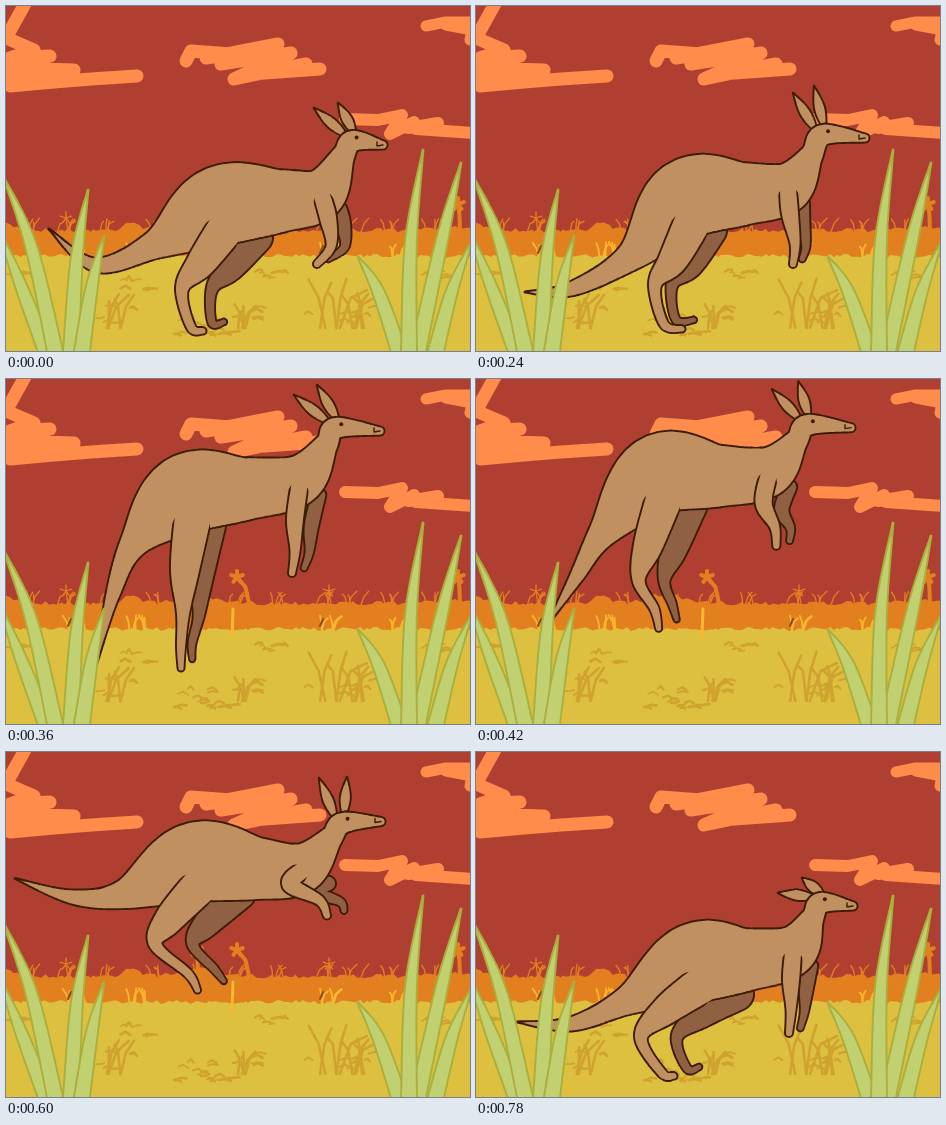
Recreate the animation shown at these times as an HTML page with a canvas. Size 464 by 345 pixels, loop 0.84 s.

```html
<!DOCTYPE html>
<html lang="en">
<head>
<meta charset="utf-8">
<title>Hopping kangaroo</title>
<style>
html, body { margin: 0; width: 100%; height: 100%; overflow: hidden; background: #af4031; }
canvas { display: block; }
</style>
</head>
<body>
<canvas id="stage" width="464" height="345"></canvas>
<script>
const W = 464, H = 345, LOOP = 840, STEP = 60;
const SKY = '#af4031', CLOUD = '#ff8c4a', BUSH = '#e28020', TUFT = '#f9b62f';
const GROUND = '#dec040', STRAW = '#d0a22f', BLADE = '#c1d070', BLADE_EDGE = '#aaae3c';
const FUR = '#c09061', SHADE = '#8f6041', INK = '#3d1c06';

// Joint positions of the key poses.
// spine: tail tip, tail, tail root, rump, waist, shoulder, neck, crown, nose
// leg: knee, hock, heel, toe; arm: elbow, wrist, hand; ears: near tip, far tip
// stride and reach: how far the far leg and far arm are ahead of the near ones
const poses = [
  { at: 0, stride: [30], reach: [16],
    spine: [43, 223, 90, 259, 150, 238, 213, 200, 275, 195, 315, 188, 337, 150, 347, 135, 377, 139],
    leg: [195, 257, 176, 283, 185, 321, 197, 325], arm: [322, 212, 325, 240, 311, 258],
    ears: [308, 102, 332, 97] },
  { at: 120, stride: [25], reach: [19],
    spine: [38, 242, 85, 266, 147, 246, 215, 199, 270, 196, 315, 191, 343, 159, 353, 146, 388, 150],
    leg: [192, 258, 172, 282, 188, 321, 204, 324], arm: [317, 208, 326, 232, 320, 250],
    ears: [322, 106, 351, 103] },
  { at: 240, stride: [17], reach: [13],
    spine: [49, 286, 95, 283, 155, 250, 210, 193, 268, 188, 311, 182, 335, 150, 347, 129, 389, 132],
    leg: [197, 254, 179, 279, 188, 318, 206, 323], arm: [314, 208, 319, 238, 317, 258],
    ears: [317, 87, 338, 80] },
  { at: 360, stride: [16], reach: [17],
    spine: [89, 290, 107, 215, 129, 163, 180, 115, 240, 110, 293, 101, 320, 66, 330, 49, 374, 52],
    leg: [179, 190, 177, 235, 175, 268, 175, 289], arm: [289, 140, 289, 172, 286, 194],
    ears: [288, 16, 311, 6] },
  { at: 540, stride: [45], reach: [22],
    spine: [33, 163, 88, 162, 124, 134, 185, 57, 243, 71, 290, 77, 319, 57, 335, 40, 377, 42],
    leg: [158, 120, 134, 133, 185, 153, 198, 170], arm: [285, 92, 318, 99, 329, 112],
    ears: [312, -1, 345, -4] },
  { at: 660, stride: [30], reach: [26],
    spine: [-15, 90, 45, 128, 113, 150, 192, 163, 257, 162, 300, 156, 330, 116, 339, 102, 373, 97],
    leg: [168, 215, 165, 252, 179, 290, 185, 306], arm: [284, 173, 309, 198, 313, 215],
    ears: [314, 53, 337, 54] },
  { at: 780, stride: [36], reach: [16],
    spine: [41, 270, 95, 272, 152, 248, 218, 211, 270, 208, 316, 199, 336, 167, 345, 151, 377, 154],
    leg: [190, 258, 165, 285, 186, 321, 198, 324], arm: [315, 228, 315, 258, 313, 281],
    ears: [302, 141, 326, 126] }
];
poses.push({ ...poses[0], at: LOOP });

const SPINE_R = [0.5, 7.5, 15, 40, 31.5, 25, 12, 11, 4.5];
const LEG_R = [19, 15, 7, 5, 3.5];
const ARM_R = [9, 9, 5.5, 4];
const EAR_R = [2.5, 5.5, 0.3];

const mix = (a, b, k) => a + (b - a) * k;
const between = (p, q, k) => [mix(p[0], q[0], k), mix(p[1], q[1], k)];
const shift = (p, dx, dy) => [p[0] + dx, p[1] + dy];

function poseAt(time) {
  const next = poses.findIndex(p => p.at > time);
  const a = poses[next - 1], b = poses[next];
  const k = (time - a.at) / (b.at - a.at);
  const joints = part => {
    const flat = a[part].map((v, i) => mix(v, b[part][i], k));
    return flat.length < 2 ? flat[0]
      : flat.flatMap((x, i) => i % 2 ? [] : [[x, flat[i + 1]]]);
  };
  return {
    spine: joints('spine'), leg: joints('leg'), arm: joints('arm'),
    ears: joints('ears'), stride: joints('stride'), reach: joints('reach')
  };
}

// Smooth samples [x, y, radius] along a chain of joints.
function samples(joints, radii, perJoint = 40) {
  const knots = joints.map((p, i) => [...p, radii[i]]);
  const at = i => knots[Math.max(0, Math.min(knots.length - 1, i))];
  const out = [];
  for (let s = 0; s <= (knots.length - 1) * perJoint; s++) {
    const i = Math.floor(s / perJoint), t = s / perJoint - i;
    const [p, q, r, u] = [at(i - 1), at(i), at(i + 1), at(i + 2)];
    out.push(q.map((v, n) => v + t * ((r[n] - p[n]) / 2
      + t * (p[n] - 2.5 * v + 2 * r[n] - u[n] / 2
      + t * (1.5 * (v - r[n]) + (u[n] - p[n]) / 2)))));
  }
  return out;
}

function dots(g, list, color, grow) {
  g.fillStyle = color;
  g.beginPath();
  for (const [x, y, r] of list) {
    const radius = Math.max(0, r + grow);
    g.moveTo(x + radius, y);
    g.arc(x, y, radius, 0, Math.PI * 2);
  }
  g.fill();
}

// Tapered limb; the outline is left open over the first `open` samples.
function limb(g, joints, radii, color, { open = 0, edge = INK } = {}) {
  const list = samples(joints, radii);
  dots(g, list.slice(open), edge, 1);
  dots(g, list, color, -0.9);
}

function layer(paint) {
  const canvas = document.createElement('canvas');
  canvas.width = W;
  canvas.height = H;
  const g = canvas.getContext('2d');
  g.lineCap = g.lineJoin = 'round';
  paint(g);
  return canvas;
}

function line(g, color, width, ...points) {
  g.strokeStyle = color;
  g.lineWidth = width;
  g.beginPath();
  for (const p of points) g.lineTo(...p);
  g.stroke();
}

let seed = 7;
const rand = (lo, hi) => {
  seed = (seed * 16807) % 2147483647;
  return mix(lo, hi, seed / 2147483647);
};

function ragged(g, color, height, jag) {
  g.fillStyle = color;
  g.beginPath();
  g.moveTo(0, H);
  for (let x = 0; x < W + 5; x += rand(2, 5)) g.lineTo(x, height(x) + rand(-jag, jag));
  g.lineTo(W, H);
  g.fill();
}

function flower(g, x, y, r, width, lean) {
  for (let i = 0; i < 5; i++) {
    const a = Math.PI * (0.4 * i - 0.5);
    line(g, BUSH, width, [x, y], [x + r * Math.cos(a), y + r * Math.sin(a)]);
  }
  line(g, BUSH, width, [x, y], [x + lean * 0.7, y + 10], [x + lean, 224]);
}

function tuft(g, color, x, y, w, h, count, width) {
  for (let i = 0; i < count; i++) {
    const px = x + rand(-w, w) / 2, lean = rand(-0.4, 0.7) * h;
    line(g, color, width, [px, y], [px + lean * 0.4, y - h * 0.6], [px + lean, y - h * rand(0.7, 1)]);
  }
}

function dashes(g, x, y, w, h, count) {
  for (let i = 0; i < count; i++) {
    const px = x + rand(-w, w) / 2, py = y + rand(-h, h) / 2, len = rand(5, 13);
    line(g, STRAW, rand(1.5, 3), [px, py], [px + len / 2, py - rand(0, 3)], [px + len, py + rand(-2, 2)]);
  }
}

const hump = (x, middle, width) => Math.exp(-(((x - middle) / width) ** 2));
const bushTop = x => 224 - 8 * hump(x, 188, 22) - 9 * hump(x, 125, 10) - 5 * hump(x, 0, 14) - 4 * hump(x, 445, 20);

const backdrop = layer(g => {
  g.fillStyle = SKY;
  g.fillRect(0, 0, W, H);
  // Clouds are scribbled with a fat brush.
  line(g, CLOUD, 13, [20, -4], [0, 32], [28, 44], [4, 52], [44, 50], [4, 62], [68, 64], [4, 72],
    [45, 75], [4, 80], [48, 76], [85, 73], [131, 70]);
  line(g, CLOUD, 13, [180, 55], [185, 45], [225, 48], [200, 52], [272, 38], [215, 58], [285, 47],
    [228, 73], [300, 58], [245, 68], [314, 63]);
  line(g, CLOUD, 12, [339, 113], [372, 114], [396, 109], [384, 128], [408, 116], [402, 122],
    [432, 117], [410, 123], [466, 127]);
  line(g, CLOUD, 11, [420, 20], [440, 16], [468, 16], [440, 19], [466, 24], [464, 34]);

  ragged(g, BUSH, bushTop, 2.2);
  for (const x of [60, 323]) flower(g, x, 212, 6, 1.3, 2);
  for (const x of [190, 231, 452]) flower(g, x, 198, 6, 4, x === 231 ? 12 : 2);
  for (let x = 20; x < W; x += rand(28, 50)) tuft(g, BUSH, x, 226, 16, 14, 4, 1.3);

  for (const x of [72, 133, 320, 392]) tuft(g, TUFT, x, 252, 20, 16, 6, 1.8);
  for (const x of [62, 314]) line(g, '#8a4a20', 2, [x, 247], [x + 3, 240]);
  ragged(g, GROUND, () => 250, 2);
  line(g, TUFT, 3, [226, 258], [227, 230]);

  for (const x of [8, 260, 428]) dashes(g, x, 269, 36, 7, 6);
  dashes(g, 130, 279, 32, 12, 6);
  dashes(g, 195, 319, 56, 22, 18);
  for (const [x, size] of [[108, 36], [238, 24], [322, 50], [350, 40]]) {
    tuft(g, STRAW, x, 322, size / 2, size, 5, 2.6);
    dashes(g, x, 308, size, 18, 5);
  }
});

const foreground = layer(g => {
  // Tip, middle and foot of each grass blade.
  const blades = [
    [[-8, 222], [15, 280], [40, 345]],
    [[-2, 172], [25, 240], [49, 345]],
    [[82, 184], [71, 250], [65, 345]],
    [[98, 230], [86, 280], [76, 345]],
    [[352, 251], [372, 285], [393, 345]],
    [[466, 235], [446, 285], [430, 345]],
    [[455, 157], [437, 230], [412, 345]],
    [[417, 144], [405, 235], [403, 345]]
  ];
  for (const blade of blades) limb(g, blade, [0.5, 6, 8], BLADE, { edge: BLADE_EDGE });
});

const ctx = document.getElementById('stage').getContext('2d');
ctx.lineCap = ctx.lineJoin = 'round';

function kangaroo({ spine, leg, arm, ears, stride, reach }) {
  const [crown, nose] = spine.slice(-2);
  const nearLeg = [shift(spine[3], 7, 22), ...leg];
  const nearArm = [shift(spine[5], 1, 2), ...arm];
  const farLeg = nearLeg.map((p, i) => shift(p, stride * (i < 3 ? 1 : 0.7), 9 - 4.5 * i));
  const farArm = nearArm.map((p, i) => shift(p, reach * (1.1 - 0.13 * i), 13 - 6 * i));
  const ear = (base, tip) => limb(ctx, [base, between(base, tip, 0.45), tip], EAR_R, FUR);

  ear(shift(crown, 1, -9), ears[1]);
  ear(shift(crown, -8, -6), ears[0]);
  limb(ctx, farLeg, LEG_R.map(r => r * 0.9), SHADE);
  limb(ctx, farArm, ARM_R.map(r => r * 0.85), SHADE);
  limb(ctx, spine, SPINE_R, FUR);
  limb(ctx, nearLeg, LEG_R, FUR, { open: 12 });
  limb(ctx, nearArm, ARM_R, FUR, { open: 14 });

  dots(ctx, [[...shift(between(crown, nose, 0.12), 0, -4), 2]], INK, 0);
  line(ctx, INK, 1.4, shift(nose, -6, -3), shift(nose, -6, 1), nose);
}

function draw() {
  const time = Math.floor(performance.now() % LOOP / STEP) * STEP;
  ctx.drawImage(backdrop, 0, 0);
  kangaroo(poseAt(time));
  ctx.drawImage(foreground, 0, 0);
  requestAnimationFrame(draw);
}
draw();
</script>
</body>
</html>
```
